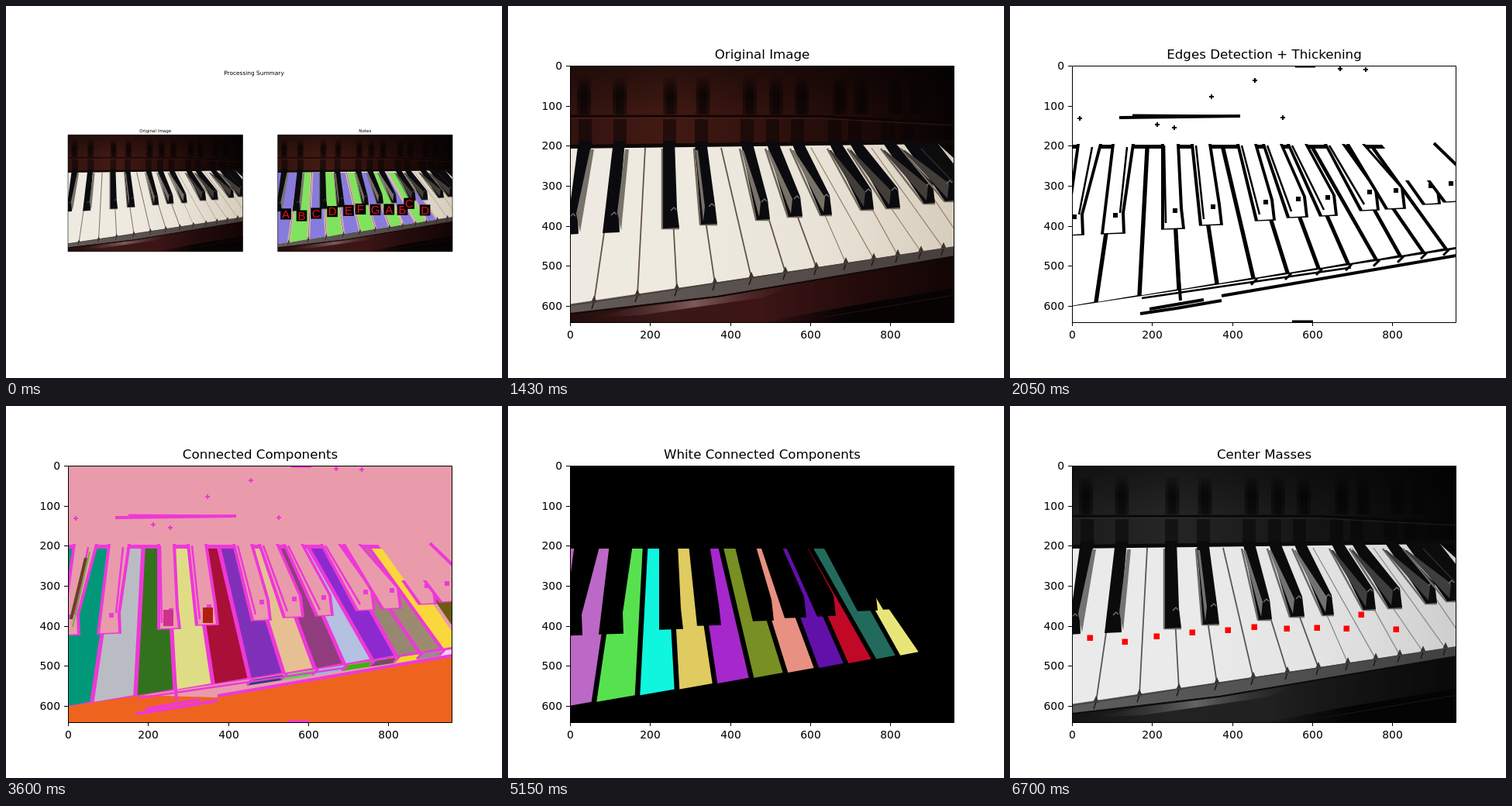
An HTML page with a canvas for the animation above (8 s loop, 640 by 480 pixels).

```html
<!DOCTYPE html>
<html lang="en">
<head>
<meta charset="utf-8">
<title>Piano key detection</title>
<style>
html, body { margin: 0; width: 640px; height: 480px; overflow: hidden; background: #fff; }
canvas { display: block; }
</style>
</head>
<body>
<canvas id="stage" width="640" height="480"></canvas>
<script>
const c = document.getElementById('stage').getContext('2d');
const X = 80, Y = 77, W = 496, H = 331, R = X + W, B = Y + H, UNIT = W / 960;
const SANS = '"DejaVu Sans", sans-serif';

// Black keys: left at the top, left and right at the foot, foot height
const blacks = [[91,75,91,294], [136,122,144,292], [200,200,221,286], [241,249,270,281],
  [300,321,338,275], [333,362,380,271], [365,404,418,269], [413,456,472,262],
  [439,489,506,260], [482,537,551,254], [508,564,577,251]];
// Joints between white keys: x at the top and at the front
const joints = [[60,60], [140,111], [177,167], [208,218], [241,267], [275,314], [308,358],
  [341,398], [371,436], [391,472], [426,503], [441,533], [469,562], [505,590], [600,640]];
const centers = [[103,299], [148,304], [189,297], [235,292], [281,289], [315,285],
  [357,287], [396,286], [434,287], [453,269], [498,288]];
const specks = [[90,145], [260,117], [316,96], [352,144], [426,81], [459,82], [190,153], [212,157]];

const segmentColors = ('#009878 #b9bdc3 #33721c #dfdc86 #a81038 #8030b8 #e6c092 #923c80 #b4c1e0 ' +
  '#8c2ad0 #968672 #9c8b70 #fad83c #6c5c10').split(' ');
const whiteColors = ('#bc68c6 #57e14f #10f5dd #dfcb60 #a628cc #788f24 #e89182 #6110aa #c10826 ' +
  '#226b5c #e8e578').split(' ');
const frontColors = '#284080 #58d850 #90c0dc #40b010 #705060 #f0d828 #9c8894 #f0d0f0'.split(' ');

const frontY = x => 398.8 - .153 * x;
const railLine = [X,397, 270,375, R,323];

function trace(p) {
  c.beginPath();
  for (let i = 0; i < p.length; i += 2) c.lineTo(p[i], p[i + 1]);
}
function fill(p, color) { trace(p); c.fillStyle = color; c.fill(); }
function line(p, color, width) {
  trace(p);
  c.strokeStyle = color;
  c.lineWidth = width;
  c.stroke();
}
function rect(x, y, w, h, color) { c.fillStyle = color; c.fillRect(x, y, w, h); }
function text(s, x, y, size, align = 'center', color = '#000', font = SANS) {
  c.font = `${size}px ${font}`;
  c.textAlign = align;
  c.fillStyle = color;
  c.fillText(s, x, y);
}
function gradient(x0, y0, x1, y1, ...colors) {
  const g = c.createLinearGradient(x0, y0, x1, y1);
  colors.forEach((color, i) => g.addColorStop(i / (colors.length - 1), color));
  return g;
}
const across = (...colors) => gradient(X, 0, R, 0, ...colors);

// Outline of a black key, widened on the left, on the right and at the foot
function blackShape([l, bx, fx, fy], i, left = 0, right = 0, foot = 0, top = 174) {
  const r = l + (i ? 15 : 18), shoulder = i < 2 ? 1 : 3;
  return [l - left,top, r + right,top, fx - shoulder + foot,fy - 25, fx + foot,fy + foot / 3,
    bx - foot,fy + 1 + foot / 3, l - left,top];
}
function mask(k, i, shrink = 0) {
  const left = i < 3 || i > 7 ? 5 : 8, right = i < 2 ? 10 : 4;
  return blackShape(k, i, left - shrink, right - shrink, 5 - shrink, 178);
}
function whiteShape(i, inset, top = 184) {
  const [a, b] = joints[i], [d, e] = joints[i + 1];
  return [a + inset,top, d - inset,top, e - inset,frontY(e), b + inset,frontY(b)];
}
function below(y, draw) {
  c.save();
  c.beginPath();
  c.rect(X, y, W, H);
  c.clip();
  draw();
  c.restore();
}
// The last detected key only shows below its black neighbours
function whiteKeys(colors, inset) {
  colors.forEach((color, i) => below(i == 10 ? 240 : 180, () => fill(whiteShape(i, inset), color)));
}

function wood() {
  rect(X, Y, W, 110, across('#32130f', '#431a13', '#32120e', '#1d0a08', '#070303'));
  rect(X, Y, W, 64, gradient(0, Y, 0, 141, '#00000066', '#00000000'));
  blacks.forEach(([l], i) => {
    const x = l + i * 1.2, shade = gradient(0, 88, 0, 140, '#08030300', '#080303a0', '#08030370');
    rect(x - 2, 88, 18, 52, shade);
    rect(x + 2, 93, 10, 47, shade);
    rect(l, 146, 17, 32, '#0a04048c');
  });
  line([X,142, 400,142, R,151], '#0c0404', 2.5);
  line([X,145, 400,145, R,154], '#55251c90', 1);
  line([X,182, 400,178, R,176], '#100707', 6);
}

function rail() {
  fill([...railLine, R,B, X,B], across('#250d0d', '#3a1818', '#3c1516', '#240b0b', '#120505'));
  fill([105,402, 165,389, 270,376, 375,358, 330,376, 170,399],
    gradient(105, 0, 375, 0, '#4a232300', '#7d5a59', '#4a202000'));
  fill([330,B, 430,389, R,364, R,B], gradient(330, 0, 440, 0, '#08030300', '#070303'));
  line([405,402, R,373], '#26100e', 1);
  line(railLine, '#120909', 2);
}

function blackKeys() {
  fill([520,176, 555,178, R,205, R,236], '#0c0b0d');
  blacks.forEach((k, i) => {
    const [l, bx, fx, fy] = k, r = l + 15;
    if (i > 1) line([l - 1,184, bx - 1,fy + 1, fx,fy + 1], '#72685c', 2.5);
    fill(blackShape(k, i), '#0b0b0f');
    if (i < 2) fill([r,185, r + 5,185, fx + 2,fy - 2, fx - 3,fy - 26], '#77736a');
    else if (i > 2) {
      fill([l + 1,186, l + 4,186, bx + 5,fy - 22, bx + 3,fy - 3], i < 7 ? '#777167' : '#423d39');
    }
    line([fx - 11,fy - 22, fx - 7,fy - 26, fx - 4,fy - 23], '#777780', 1.2);
  });
  line([533,184, R,229], '#302c29', 1.5);
}

function photo() {
  rect(X, Y, W, H, '#100808');
  wood();
  fill([X,380, R,308, R,323, 270,374, X,397], across('#625b57', '#57504d', '#453e3b'));
  fill([X,184, 400,180, 555,178, R,197, R,frontY(R), X,frontY(X) - 2],
    across('#eeeae1', '#eeeae0', '#e8e2d6', '#d6cdbd'));
  joints.forEach(([a, b], i) => {
    const y = frontY(b);
    line([a,183, b,y], i > 7 ? '#9b8067' : '#65534a', i > 7 ? 1.2 : 1.8);
    fill([b - 4,y + 1, b,y - 8, b + 4,y + 1], '#3c3330');
    line([b,y, b - 3,y + 9], '#201918', 1.5);
  });
  line([X,frontY(X), R,frontY(R)], '#4a403a', 1.5);
  rail();
  blackKeys();
}

// Key outlines and key areas on a plain background
function edges(color, back, keyColors) {
  fill([X,179, 480,179, 590,frontY(590), R,frontY(R) + 3, X,frontY(X) + 1], color);
  whiteKeys(keyColors, 2.7);
  fill([480,174, R,174, R,250], back);
  blacks.forEach((k, i) => {
    const [l, bx, fx, fy] = k;
    if (i < 9) fill(mask(k, i), color);
    else below(225, () => fill(mask(k, i), color));
    fill(mask(k, i, 4), back);
    if (i > 1 && i < 8) line([l - 1,180, bx + 1,fy - 6], color, 2.5);
    if (i < 2) line([l + 15,182, fx - 2,fy - 25], color, 2.5);
    rect(fx - 11, fy - 25, 6, 6, color);
  });
  line([547,177, R,205], color, 4);
  line([141,144, 297,142], color, 4);
  line([158,141, 296,142], color, 3);
  line([170,377, 440,frontY(440) + 6], color, 2.5);
  line([273,374, R,322], color, 4);
  line([217,340, 220,380], color, 4);
  line([168,397, 215,390, 273,380], color, 4);
  line([180,391, 250,379], color, 4);
  joints.slice(5, 13).forEach(([, b]) => line([b + 5,frontY(b) + 1, b - 3,frontY(b) + 9], color, 3));
  line([368,78, 394,78], color, 3);
  line([364,407, 391,407], color, 3);
  specks.forEach(([x, y]) => {
    rect(x - 3, y - 1, 6, 2, color);
    rect(x - 1, y - 3, 2, 6, color);
  });
}

function edgeMap() {
  rect(X, Y, W, H, '#fff');
  edges('#000', '#fff', segmentColors.map(() => '#fff'));
}

function segments() {
  rect(X, Y, W, H, '#e99bac');
  fill([X,384, 170,373, 270,376, R,323, R,B, X,B], '#ee641e');
  frontColors.forEach((color, i) => {
    const a = joints[i + 5][1], b = joints[i + 6][1];
    fill([a,frontY(a) + 3, b,frontY(b) + 3, b - 3,frontY(b) + 10, a - 3,frontY(a) + 10], color);
  });
  edges('#ee38d8', '#e99bac', segmentColors);
  line([103,196, 84,275], '#684020', 4);
  line([108,188, 86,285], '#48b820', 1.5);
  rect(203, 263, 13, 21, '#cf308c');
  rect(254, 260, 13, 20, '#b02010');
}

function components() {
  rect(X, Y, W, H, '#000');
  whiteKeys(whiteColors, 3.3);
  blacks.forEach((k, i) => fill(mask(k, i), '#000'));
}

function masses() {
  photo();
  c.globalCompositeOperation = 'saturation';
  rect(X, Y, W, H, '#808080');
  c.globalCompositeOperation = 'source-over';
  centers.forEach(([x, y]) => rect(x - 3.5, y - 3.5, 7.5, 7.5, '#f00'));
}

function notes() {
  photo();
  whiteKeys(whiteColors.map(() => '#d9aaa0'), 2);
  whiteKeys(whiteColors.map((_, i) => i % 2 ? '#80e35e' : '#877cdc'), 4);
  blackKeys();
  centers.forEach(([x, y], i) => {
    rect(x - 15, y - 13, 30, 31, '#000');
    text('ABCDEFG'[i % 7], x, y + 14, 33, 'center', '#e8101c', '"Liberation Sans", Arial, sans-serif');
  });
}

function plot(title, draw) {
  below(Y, draw);
  c.strokeStyle = '#000';
  c.lineWidth = 1;
  c.strokeRect(X + .5, Y + .5, W - 1, H);
  text(title, 328, 68, 16.67);
  for (let v = 0; v <= 800; v += 100) {
    const x = Math.round(X + v * UNIT), y = Math.round(Y + v * UNIT);
    if (v % 200 == 0) {
      rect(x, B, 1, 5, '#000');
      text(v, x + .5, 429, 13.89);
    }
    if (v <= 600) {
      rect(75, y, 5, 1, '#000');
      text(v, 70, y + 5, 13.89, 'right');
    }
  }
}

function thumbnail(title, x, draw) {
  const y = 166.3, s = 225.5 / W;
  c.save();
  c.translate(x, y);
  c.scale(s, s);
  c.translate(-X, -Y);
  below(Y, draw);
  c.restore();
  c.strokeStyle = '#000';
  c.lineWidth = .6;
  c.strokeRect(x, y, W * s, H * s);
  text(title, x + W * s / 2, 163.4, 5.56);
}

function summary() {
  text('Processing Summary', 320, 88.6, 7.4);
  thumbnail('Original Image', 80, photo);
  thumbnail('Notes', 350.6, notes);
}

const scenes = [
  [6700, () => plot('Center Masses', masses)],
  [5150, () => plot('White Connected Components', components)],
  [3600, () => plot('Connected Components', segments)],
  [2050, () => plot('Edges Detection + Thickening', edgeMap)],
  [500, () => plot('Original Image', photo)],
  [0, summary]
];

c.lineJoin = 'round';
function frame() {
  const t = performance.now() % 8000;
  rect(0, 0, 640, 480, '#fff');
  scenes.find(([start]) => t >= start)[1]();
  requestAnimationFrame(frame);
}
frame();
</script>
</body>
</html>
```
